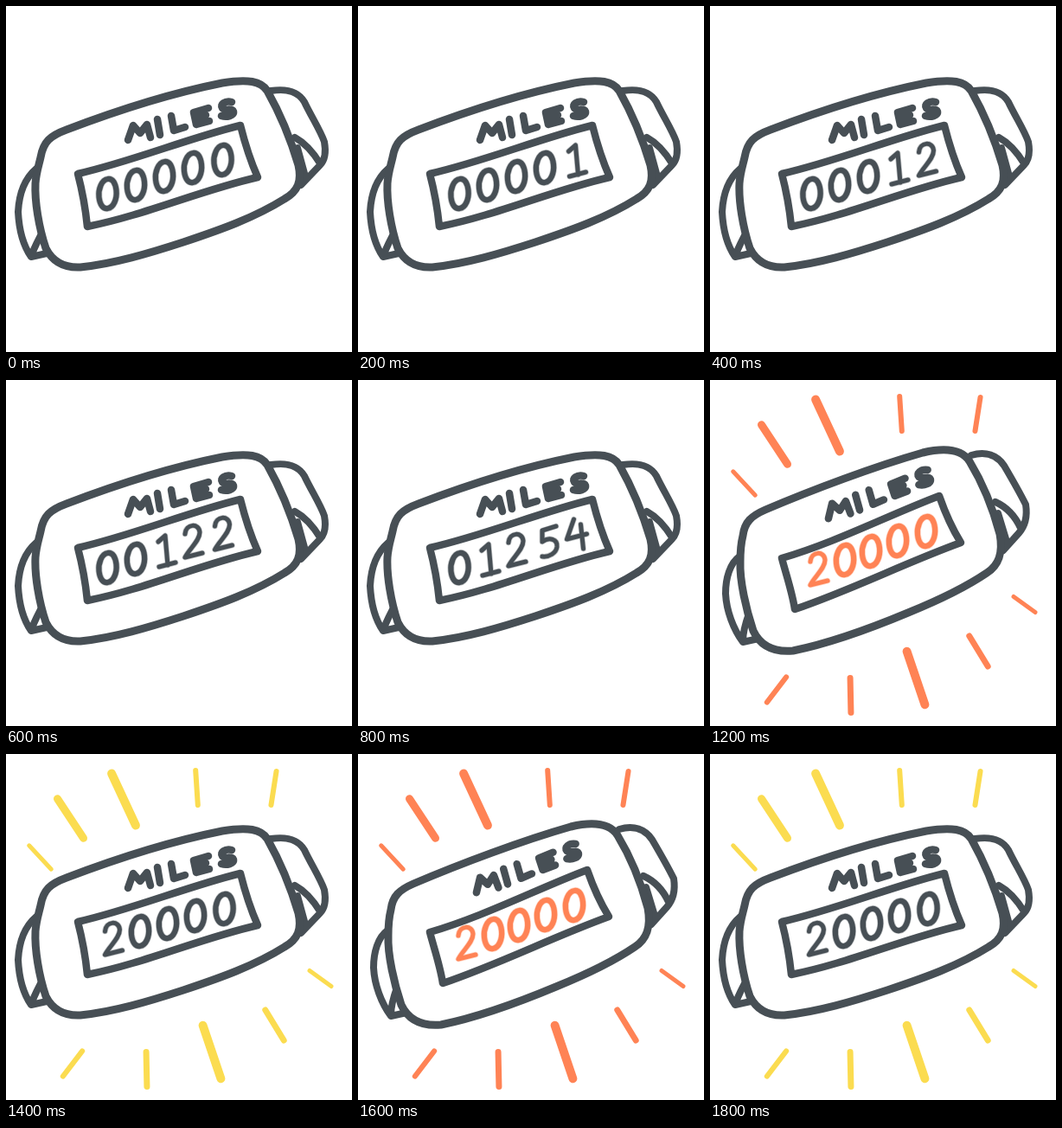
Write an HTML page that moves like this. It is 400x400 px and loops after 2000 ms.

```html
<!DOCTYPE html>
<html lang="en">
<head>
<meta charset="utf-8">
<title>Mile counter</title>
<style>
  html, body { margin: 0; width: 100%; height: 100%; overflow: hidden; background: #fff; }
  svg { display: block; width: 100%; height: 100%; }
  path { fill: none; stroke-linecap: round; stroke-linejoin: round; }
</style>
</head>
<body>
<svg id="stage" viewBox="0 0 400 400"></svg>
<script>
const INK = "#474f55", ORANGE = "#ff8355", YELLOW = "#fbdc50";
const STEP = 200;
const READINGS = ["00000", "00001", "00012", "00122", "01254", "12544"];
const CYCLE = 10;

// Glyphs drawn around their own centre
const GLYPHS = {
  0: "M0-17C-7-16-11-5-10 4C-9 13-5 18 0 17C7 16 11 6 10-4C9-12 6-18 0-17Z",
  1: "M-7-10L1-17L4 17M-6 19L13 14",
  2: "M-9-9C-8-21 7-22 8-11C8-1-4 8-9 18L11 13",
  4: "M-1-17L-9 6L14 0M7-11L10 17",
  5: "M13-18L-3-13L-3 0C5-6 15-3 14 6C13 13 5 18-3 17"
};

const LETTERS = [
  "M141 155L147 138L155 147L163 137L167 152",
  "M175 131L178 149",
  "M191 127L194 144L207 140",
  "M234 118L217 123L220 137L235 133M219 130L231 126",
  "M261 111C253 109 247 114 250 118C253 122 261 117 263 122C264 127 255 129 249 127"
];

const POSES = {
  rest: {
    body: "M40 175C43 157 51 150 70 143C125 122 190 101 250 89C280 84 295 87 302 98C315 121 328 150 338 184C342 202 338 214 322 223C287 245 247 259 205 273C165 286 125 298 86 302C66 303 53 294 46 280C38 256 33 226 34 205C35 192 38 184 40 175Z",
    panel: "M83 194C145 180 210 153 271 138C276 158 283 180 291 198C225 213 160 242 94 255C92 235 88 213 83 194Z",
    handles: "M306 98C326 95 338 99 345 111C353 128 363 143 368 157C370 168 369 178 363 184L341 207M334 152C345 158 355 169 363 182M337 164L346 197M35 188C21 200 15 218 14 238C15 258 20 277 29 290L47 286M44 258C39 267 34 276 30 287",
    digits: [[117.5, 217], [150, 207], [183, 197], [216, 187], [250.5, 178]],
    letters: ""
  },
  tilt: {
    body: "M38 180C40 164 48 157 64 150C118 127 190 100 246 84C272 78 291 80 300 94C314 117 327 148 335 178C339 200 334 214 320 223C292 242 261 256 229 269C186 287 140 304 96 313C73 315 58 307 50 290C42 266 34 232 35 210C35 198 36 188 38 180Z",
    panel: "M83 206C145 188 207 156 265 134C272 154 280 172 290 188C224 212 163 243 98 265C95 245 88 225 83 206Z",
    handles: "M302 87C319 82 332 87 340 99C350 116 359 132 365 144C367 157 364 169 357 177L339 197M330 141C343 147 353 158 359 171M333 154L343 187M34 204C23 212 18 229 18 247C19 267 27 288 38 303L56 299M45 270C41 281 38 290 38 302",
    digits: [[125, 219], [156, 208], [186, 198], [217, 186], [250, 175]],
    letters: "translate(-5 4) rotate(-6 153 147)"
  }
};

// x1, y1, x2, y2, width
const RAYS = [
  [25, 104, 54, 135, 5], [57, 48, 92, 101, 9], [120, 18, 152, 87, 10],
  [219, 16, 222, 62, 6], [313, 17, 306, 62, 6], [349, 249, 378, 270, 5],
  [298, 293, 323, 334, 7], [226, 309, 250, 380, 10], [162, 341, 163, 388, 7],
  [90, 341, 64, 375, 6]
];

const stage = document.getElementById("stage");

const path = (d, color, width, extra = "") =>
  `<path d="${d}" stroke="${color}" stroke-width="${width}" ${extra}/>`;

// Round-ended dash that fits between its two end points
function ray([x1, y1, x2, y2, w], color) {
  const k = w / 2 / Math.hypot(x2 - x1, y2 - y1);
  const dx = (x2 - x1) * k, dy = (y2 - y1) * k;
  return path(`M${x1 + dx} ${y1 + dy}L${x2 - dx} ${y2 - dy}`, color, w);
}

function digit(char, [x, y], color) {
  const at = `transform="translate(${x} ${y})"`;
  const weight = char === "0" ? 6.2 : 5;
  return path(GLYPHS[char], color, weight + 1.5, at + ' opacity=".35"') +
         path(GLYPHS[char], color, weight, at);
}

function scene(step) {
  const finale = step >= READINGS.length;
  const tilted = finale && step % 2 === 0;
  const pose = tilted ? POSES.tilt : POSES.rest;
  const reading = finale ? "20000" : READINGS[step];
  const places = finale && !tilted
    ? pose.digits.map(([x, y], i) => [x + 6 - i, y - 3 + i])
    : pose.digits;
  const digitColor = tilted ? ORANGE : INK;
  const rays = finale ? RAYS.map(r => ray(r, tilted ? ORANGE : YELLOW)).join("") : "";
  return rays +
    path(pose.handles, INK, 8) +
    path(pose.body, INK, 9, 'style="fill:#fff"') +
    path(pose.panel, INK, 8.5) +
    `<g transform="${pose.letters}">${LETTERS.map(d => path(d, INK, 8.5)).join("")}</g>` +
    [...reading].map((c, i) => digit(c, places[i], digitColor)).join("");
}

let shown = -1;
const start = performance.now();

function tick() {
  const step = Math.floor((performance.now() - start) / STEP) % CYCLE;
  if (step !== shown) {
    shown = step;
    stage.innerHTML = scene(step);
  }
  requestAnimationFrame(tick);
}
tick();
</script>
</body>
</html>
```
